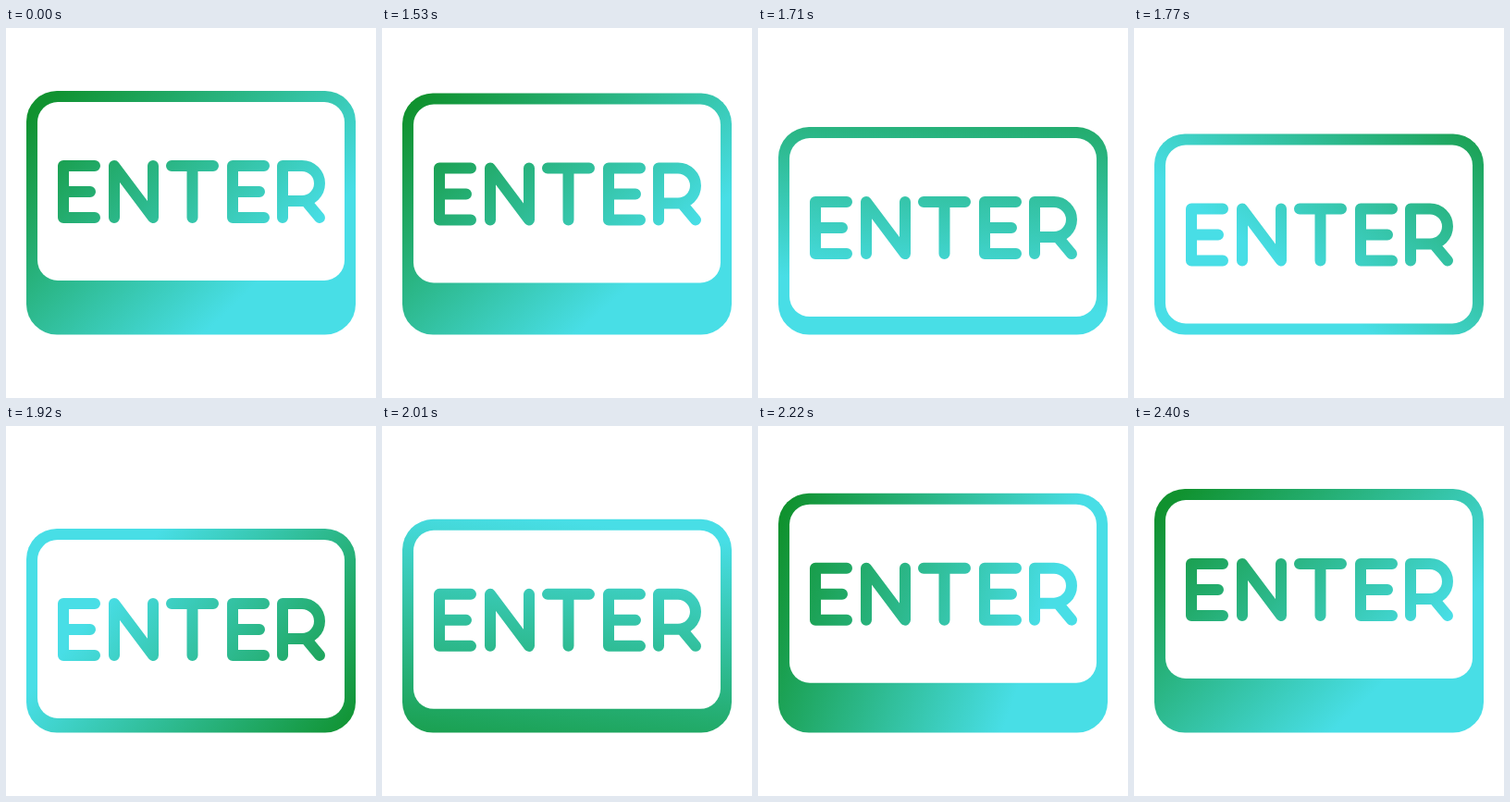
An HTML page for the animation above (2430 ms loop, 400 by 400 pixels).

```html
<!DOCTYPE html>
<html lang="en">
<head>
<meta charset="utf-8">
<title>Enter key</title>
<style>
  html, body { margin: 0; width: 100%; height: 100%; overflow: hidden; background: #fff; }
  svg { display: block; width: 100%; height: 100%; }
</style>
</head>
<body>
<svg viewBox="0 0 400 400" role="img" aria-label="ENTER">
  <defs>
    <linearGradient id="paint" gradientUnits="userSpaceOnUse">
      <stop offset="0" stop-color="#10922f"/>
      <stop offset="1" stop-color="#48dee6"/>
    </linearGradient>
    <mask id="key" maskUnits="userSpaceOnUse" x="0" y="0" width="400" height="400">
      <rect id="body" x="22" width="356" rx="33" fill="#fff"/>
      <g id="cap">
        <rect x="34" y="80" width="332" height="193" rx="22" fill="#000"/>
        <g fill="none" stroke="#fff" stroke-width="12" stroke-linecap="round" stroke-linejoin="round">
          <path id="e" d="M96 149H62V205H96M62 177H91"/>
          <path d="M117 205V149L159 205V149"/>
          <path d="M179 149H224M201.5 149V205"/>
          <use href="#e" x="183"/>
          <path d="M299 205V149H320a19 19 0 0 1 0 38H299M324 187L339 205"/>
        </g>
      </g>
    </mask>
  </defs>
  <rect width="400" height="400" fill="url(#paint)" mask="url(#key)"/>
</svg>
<script>
const LOOP = 2430, STEP = 30, FIRST_MOVE = 1530;
const START = 1488, PRESS = 300, RELEASE = 600;
const TOP = 68, BOTTOM = 331.5, TRAVEL = 47;

const paint = document.getElementById('paint');
const body = document.getElementById('body');
const cap = document.getElementById('cap');

const clamp = v => Math.min(1, Math.max(0, v));

// Eases in and out with flat ends; x1 and x2 are the handle lengths in time.
function ease(x1, x2, progress) {
  const x = clamp(progress);
  let low = 0, high = 1;
  for (let i = 0; i < 24; i++) {
    const u = (low + high) / 2, v = 1 - u;
    if (3 * v * v * u * x1 + 3 * v * u * u * x2 + u ** 3 < x) low = u;
    else high = u;
  }
  return x === 0 || x === 1 ? x : low * low * (3 - 2 * low);
}

function setAll(node, attributes) {
  for (const name in attributes) node.setAttribute(name, attributes[name]);
}

function draw(time) {
  const stepped = Math.floor(time % LOOP / STEP) * STEP;
  const t = stepped < FIRST_MOVE ? 0 : stepped - START;

  const pressed = ease(.333, .667, t / PRESS) - ease(.5, .4, (t - PRESS) / RELEASE);
  const drop = TRAVEL * pressed;
  setAll(body, { y: TOP + drop, height: BOTTOM - TOP - drop });
  cap.setAttribute('transform', `translate(0 ${drop})`);

  // The gradient line turns once around the centre and backs off under pressure.
  const angle = (46 + 360 * ease(.38, .6, t / (PRESS + RELEASE))) * Math.PI / 180;
  const shift = 33 * pressed ** 4;
  const x = d => 200 + d * Math.cos(angle);
  const y = d => 200 + d * Math.sin(angle);
  const from = -196 - shift, to = 104 - shift;
  setAll(paint, { x1: x(from), y1: y(from), x2: x(to), y2: y(to) });
}

const began = performance.now();
function tick() {
  draw(performance.now() - began);
  requestAnimationFrame(tick);
}
tick();
</script>
</body>
</html>
```
